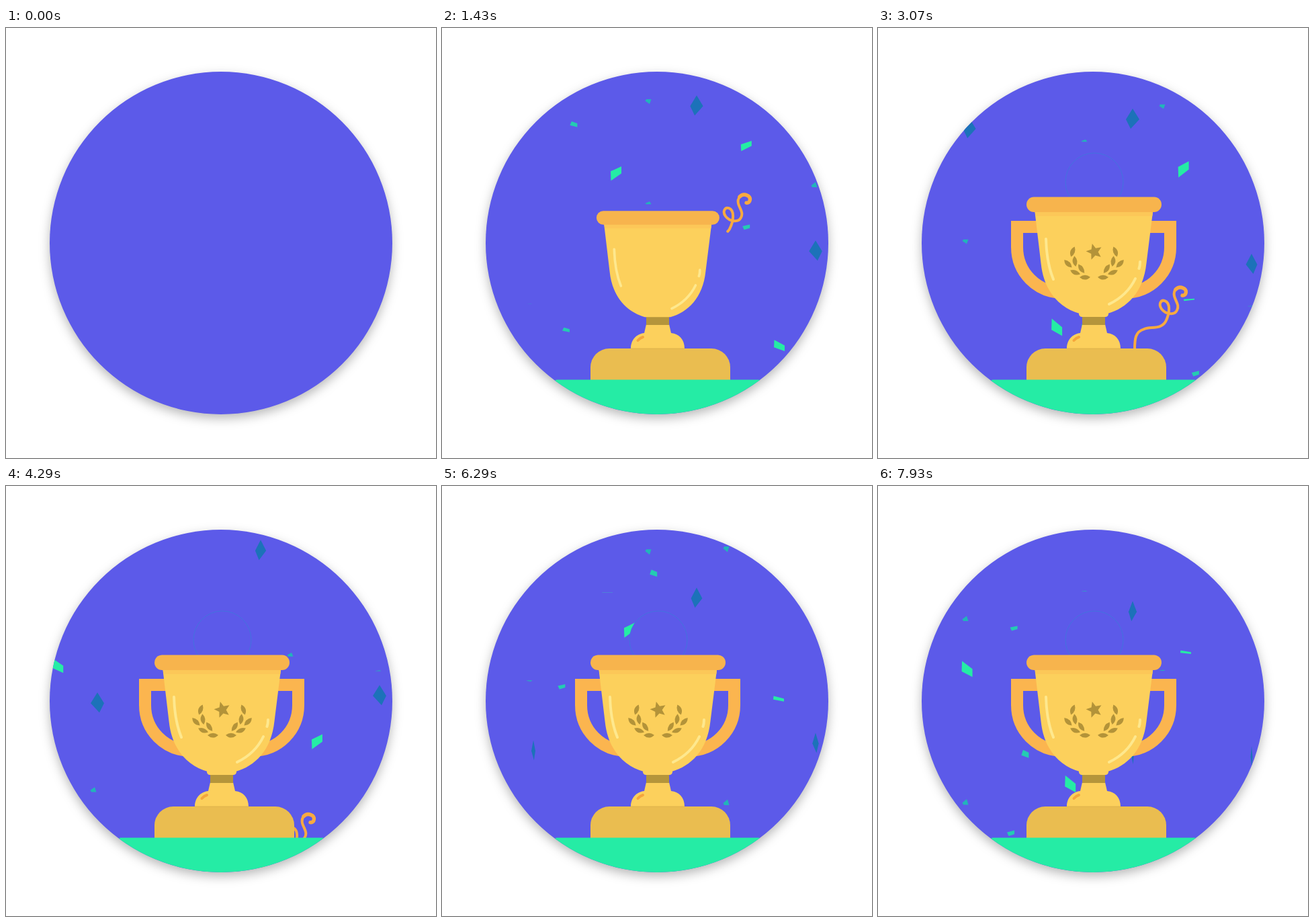
Recreate the animation shown at these times as an HTML page. Size 640 by 640 pixels, loop 8 s.

```html
<!DOCTYPE html>
<html lang="en">
<head>
<meta charset="utf-8">
<title>Trophy</title>
<style>
  html, body { margin: 0; width: 100%; height: 100%; overflow: hidden; background: #fff; }
  svg { display: block; width: 100%; height: 100%; }
  #disc { filter: drop-shadow(0 6px 8px rgba(0, 0, 0, .28)); }
</style>
</head>
<body>
<svg viewBox="0 0 640 640">
  <defs>
    <clipPath id="round"><circle cx="320" cy="320" r="255"/></clipPath>
    <path id="leaf" d="M-8 0Q0-7.5 8 0Q0 6 -8 0Z"/>
    <path id="handle" d="M245 296H207V326C207 363 236 394 276 394" fill="none" stroke="#fbb54f" stroke-width="18"/>
  </defs>
  <circle id="disc" cx="320" cy="320" r="255" fill="#5c5ae9"/>
  <g clip-path="url(#round)">
    <g id="confetti"></g>
    <circle id="halo" cx="322" cy="229" r="43" fill="#5c5ae9" stroke="#4273de"/>
    <g id="streamer" fill="none" stroke="#f8aa40" stroke-linecap="round" stroke-linejoin="round">
      <path id="ribbon" pathLength="100" stroke-width="4" d="M453 398C459 399 461 389 454 386.500C446 384 439 390 441 399C443 407 449 412 445 420C441 428 428 426 422 418C417 411 421 404 427 406C435 409 435 423 428 437C421 449 406 444 396 448C383 452 382 462 382 479"/>
      <path id="curl" stroke-width="5.400" d="M453 398C459 399 461 389 454 387C450 385 446 386 443 389"/>
    </g>
    <g id="handles">
      <use href="#handle"/>
      <use href="#handle" transform="translate(642)scale(-1 1)"/>
    </g>
    <path id="podium" d="M221 530V505A28 28 0 0 1 249 477H401A28 28 0 0 1 429 505V530Z" fill="#eabd50"/>
    <g id="foot">
      <path d="M304 441H338L341 454C353 455 361 464 361 477H281C281 464 290 455 301 454Z" fill="#fcd05c"/>
      <path d="M304 430H338V442H304Z" fill="#b5953b"/>
      <path d="M281 477H361" stroke="#d9ae4b" stroke-width=".8"/>
      <path d="M291.500 465Q295 461 299 460" fill="none" stroke="#f5a63c" stroke-width="4" stroke-linecap="round"/>
      <rect x="299" y="420" width="44" height="10" rx="4.500" fill="#fcd05c"/>
    </g>
    <g id="cup">
      <path d="M233 270L242.500 350C247 394 272 417 300 425H342C370 417 395 394 399.500 350L409.500 270Z" fill="#fcd05c"/>
      <path d="M233.500 273H409L408.300 280H234.500Z" fill="#fcc758"/>
      <rect x="221" y="251.500" width="201" height="22.500" rx="11.200" fill="#f7b44d"/>
      <path d="M250 314Q251 350 261 374M390 348Q390 354 388.500 358M383 373Q371 398 344 411" fill="none" stroke="#fee88e" stroke-width="4" stroke-linecap="round"/>
    </g>
    <g id="badge" fill="#b39339">
      <path id="star"/>
      <g id="laurel"></g>
      <use href="#laurel" transform="translate(643)scale(-1 1)"/>
    </g>
    <rect id="ground" x="168" width="306" height="110" rx="3" fill="#25eca5"/>
  </g>
</svg>
<script>
const LOOP = 8000;
const NS = 'http://www.w3.org/2000/svg';
const $ = id => document.getElementById(id);
const clamp = v => Math.max(0, Math.min(1, v));
const ease = (t, from, len) => 1 - (1 - clamp((t - from) / len)) ** 3;
const wave = (y, zero, half) => Math.sin(Math.PI * (y - zero) / half);

function add(tag, parent, attrs) {
  const el = document.createElementNS(NS, tag);
  for (const k in attrs) el.setAttribute(k, attrs[k]);
  return parent.appendChild(el);
}
function polar(cx, cy, r, deg) {
  const a = deg * Math.PI / 180;
  return [cx + r * Math.cos(a), cy + r * Math.sin(a)];
}
const move = (id, value) => $(id).setAttribute('transform', value);
const show = (el, on) => el.setAttribute('visibility', on ? 'visible' : 'hidden');
function grow(id, x, y, s) {
  move(id, `translate(${x} ${y})scale(${s})translate(${-x} ${-y})`);
  show($(id), s > 0);
}

$('star').setAttribute('d', 'M' + Array.from({ length: 10 },
  (_, i) => polar(322, 333, i % 2 ? 5.6 : 12.5, i * 36 - 105)).join('L') + 'Z');

// Laurel: an outer and an inner row of leaves along an arc.
function leaf(r, deg, tilt) {
  const [x, y] = polar(321, 333, r, deg);
  add('use', $('laurel'), { href: '#leaf', transform: `translate(${x} ${y})rotate(${deg + 90 + tilt})` });
}
for (let i = 0; i < 3; i++) {
  leaf(42 - i, 155 - 23 * i, -20);
  leaf(31, 180 - 27 * i, 20);
}

// Every kind falls at a steady speed and flips with its height.
// A lane is x, height of its first piece at time zero, and number of pieces, one per gap.
const kinds = [
  {
    speed: .142, gap: 213, color: '#1c72b9', shape: '0,-15 10,1 -3,15 -10,1',
    flip: y => [wave(y, 39, 186), 1], drift: () => 0,
    lanes: [[556, 128, 5], [379, -88, 5], [136, -287, 2]]
  },
  {
    speed: .1395, gap: 194, color: '#25eca5', shape: '-8,-4 8,-13 8,0 -7.5,13',
    flip: y => [1, wave(y, 159, 83)], drift: y => 6 * Math.cos(.0107 * (y - 395)),
    lanes: [[457, -24, 2], [251, -525, 2], [498, 273], [497, -561], [261, 17],
      [76, -331], [281, -663], [131, -834], [458, -859]]
  },
  {
    speed: .133, gap: 187, color: '#24ccb2', shape: '-5.5,-2 5.5,-6 5.5,2 -3,6',
    flip: y => [1, wave(y, 181, 149)], drift: y => .09 * y,
    lanes: [[183, 140, 2], [183, -656, 2], [144, 259], [426, 106], [151, -538], [303, -707]]
  },
  {
    speed: .11, gap: 273, color: '#22b4ba', shape: '-4.5,1 2,-4.5 4.5,4 -3,4',
    flip: y => [1, wave(y, 152, 129)], drift: () => 0,
    lanes: [[307, 103, 4], [307, -48, 3], [130, 253, 2], [130, -402, 2], [554, 76, 2], [423, -221], [423, -598]]
  }
];

const pieces = kinds.flatMap(kind => kind.lanes.flatMap(([x, y, count = 1]) =>
  Array.from({ length: count }, (_, i) => ({
    kind, x, y: y - i * kind.gap,
    el: add('polygon', $('confetti'), { points: kind.shape, fill: kind.color })
  }))));

function drawPiece({ kind, x, y: y0, el }, t) {
  const y = y0 + t * kind.speed;
  const [sx, sy] = kind.flip(y);
  show(el, t > 35 && y > 40 && y < 545);
  el.setAttribute('transform', `translate(${x + kind.drift(y)} ${y})scale(${sx} ${sy})`);
}

function draw(t) {
  pieces.forEach(p => drawPiece(p, t));

  $('ground').setAttribute('y', 523.5 + 56 * (1 - ease(t, 35, 950)));
  move('podium', `translate(0 ${110 * (1 - ease(t, 350, 750))})`);
  grow('foot', 321, 477, ease(t, 650, 650));
  grow('cup', 320.5, 484, ease(t, 1000, 780));
  grow('handles', 321, 350, t > 1550 ? .6 + .4 * ease(t, 1550, 700) : 0);
  grow('halo', 322, 272, ease(t, 1750, 600));
  grow('badge', 321.5, 348, ease(t, 1900, 600));

  move('streamer', `translate(0 ${(t - 3070) * .0841})`);
  const length = 68 * clamp((t - 650) / 780) + 32 * clamp((t - 1430) / 900);
  $('ribbon').setAttribute('stroke-dasharray', `${length} 200`);
  show($('ribbon'), t > 650 && t < 5000);
  show($('curl'), t > 900 && t < 5000);
}

const start = performance.now();
function tick() {
  draw((performance.now() - start) % LOOP);
  requestAnimationFrame(tick);
}
draw(0);
requestAnimationFrame(tick);
</script>
</body>
</html>
```
